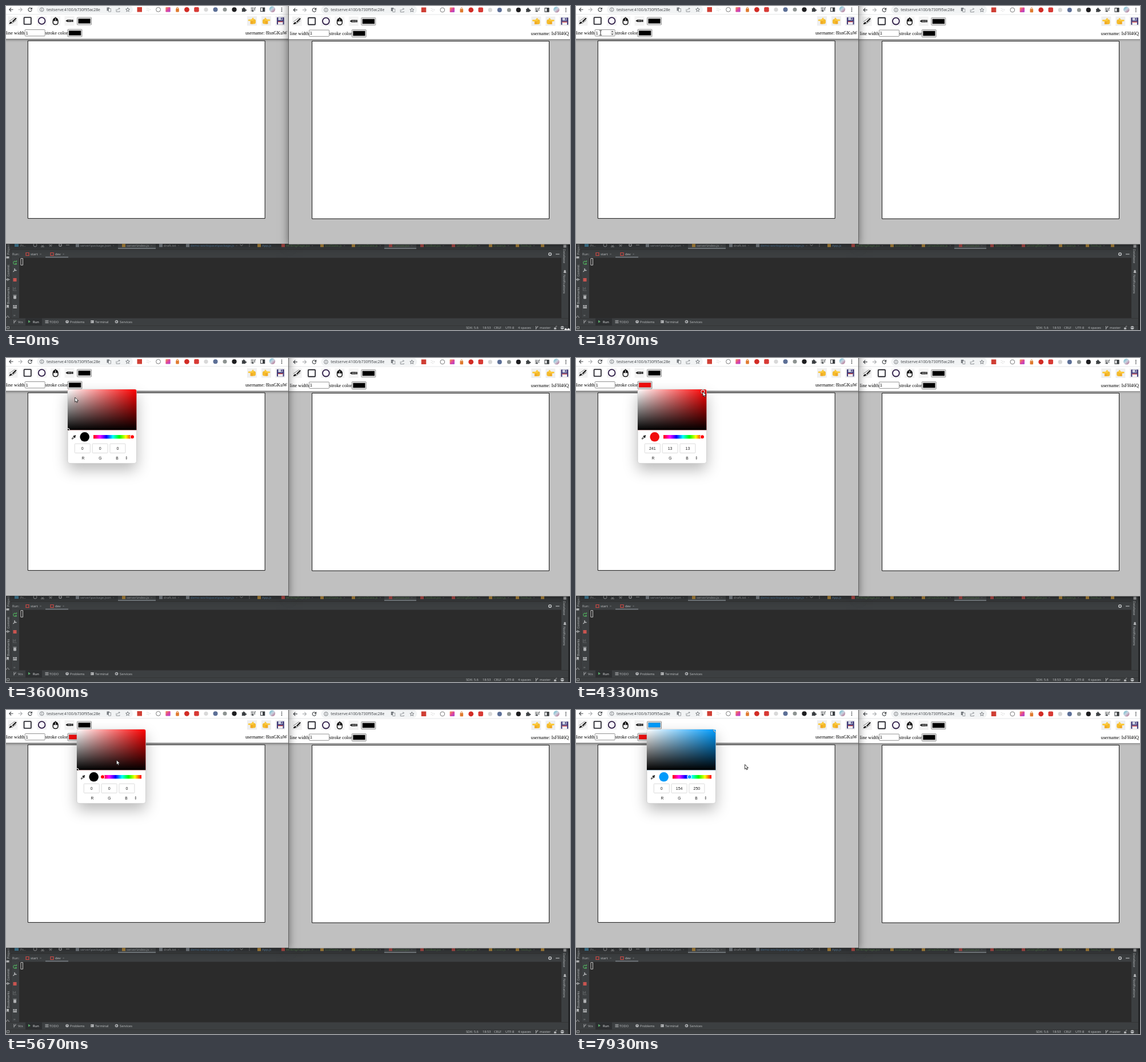
An HTML page with a canvas for the animation above (8000 ms loop, 987 by 568 pixels).

```html
<!DOCTYPE html>
<html lang="en">
<head>
<meta charset="utf-8">
<title>Shared drawing board</title>
<style>
html, body { margin: 0; width: 100%; height: 100%; overflow: hidden; background: #2b2b2b; }
canvas { display: block; }
</style>
</head>
<body>
<canvas id="stage" width="987" height="568"></canvas>
<script>
const ctx = document.getElementById('stage').getContext('2d');
const LOOP = 8000, TAU = Math.PI * 2;
const SANS = '"Noto Sans", sans-serif', ARIAL = '"Liberation Sans", Arial, sans-serif';
const SERIF = '"Liberation Serif", "Times New Roman", serif';
const HUE = 203;

// ---- drawing helpers ----
function rect(x, y, w, h, color) {
  ctx.fillStyle = color;
  ctx.fillRect(x, y, w, h);
}
function box(x, y, w, h, fill, stroke, radius = 0, width = 1) {
  ctx.beginPath();
  ctx.roundRect(x, y, w, h, radius);
  if (fill) { ctx.fillStyle = fill; ctx.fill(); }
  if (stroke) { ctx.strokeStyle = stroke; ctx.lineWidth = width; ctx.stroke(); }
}
function disc(x, y, r, fill, stroke, width = 1) {
  ctx.beginPath();
  ctx.arc(x, y, r, 0, TAU);
  if (fill) { ctx.fillStyle = fill; ctx.fill(); }
  if (stroke) { ctx.strokeStyle = stroke; ctx.lineWidth = width; ctx.stroke(); }
}
function icon(x, y, path, stroke, width = 1, fill) {
  ctx.save();
  ctx.translate(x, y);
  const p = new Path2D(path);
  if (fill) { ctx.fillStyle = fill; ctx.fill(p); }
  if (stroke) { ctx.strokeStyle = stroke; ctx.lineWidth = width; ctx.stroke(p); }
  ctx.restore();
}
function text(str, x, y, size, color, font = SANS, align = 'left') {
  ctx.font = `${size}px ${font}`;
  ctx.fillStyle = color;
  ctx.textAlign = align;
  ctx.textBaseline = 'alphabetic';
  ctx.fillText(str, x, y);
}
function turned(str, x, y, angle) {
  ctx.save();
  ctx.translate(x, y);
  ctx.rotate(angle);
  text(str, 0, 0, 5.6, '#b4b8ba');
  ctx.restore();
}
function shadow(color, blur, dy = 0) {
  ctx.shadowColor = color;
  ctx.shadowBlur = blur;
  ctx.shadowOffsetY = dy;
}

// ---- editor behind the two browser windows ----
const TABS = [
  ['server\\package.json', 130, '#a9b0b5', '#8a9299'], ['server\\index.js', 211, '#bcc1c5', '#c99a45'],
  ['draft.txt', 276, '#b0b5b8', '#8a9299'], ['demo-workspace\\package.js', 323, '#5b8bb5', '#8a9299'],
  ['App.js', 448, '#6897bb', '#c99a45'], ['WritingPage.jsx', 490, '#5f8a55', '#c75450'],
  ['toolState.js', 558, '#5f8a55', '#c99a45'], ['canvasState.js', 613, '#5f8a55', '#c99a45'],
  ['Canvas.jsx', 678, '#5f8a55', '#c75450'], ['Toolbar.jsx', 733, '#5f8a55', '#c75450'],
  ['SettingBar.jsx', 788, '#5f8a55', '#c75450'], ['Eraser.js', 853, '#5f8a55', '#c99a45'],
  ['Tools.js', 900, '#5f8a55', '#c99a45'], ['', 944, '', '#c99a45']
];
const FOOTER = [['Vcs', 21], ['Run', 47], ['TODO', 76], ['Problems', 112], ['Terminal', 156], ['Services', 199]];
const STATUS = [['SDK: 5.6', 805], ['18:53', 834], ['CRLF', 854], ['UTF-8', 874], ['4 spaces', 896], ['master', 934]];

function drawEditor() {
  const grey = '#afb1b3';
  rect(0, 410, 987, 158, '#3c3f41');
  rect(196, 412, 66, 14, '#4e5254');
  rect(662, 412, 56, 14, '#4e5254');
  rect(196, 424, 66, 2, '#7d8488');
  rect(662, 424, 56, 2, '#7d8488');
  rect(0, 426, 972, 1, '#323232');
  rect(15, 417, 7, 5, '#4b8fae');
  text('Pr...', 25, 421.5, 5.7, grey);
  disc(51, 419, 3, null, grey);
  icon(64, 419, 'M-3 3H3M-2 0L0 2L2 0', grey);
  icon(78, 419, 'M-3 0H3M-2 3L0 1L2 3', grey);
  disc(95, 419, 2.2, null, grey, 1.5);
  rect(105, 418.5, 6, 1, grey);
  for (const [name, x, color, mark] of TABS) {
    rect(x - 8, 417, 6, 5.5, mark);
    text(name, x, 421.6, 5.7, color);
    if (name && x !== 448) text('×', x + ctx.measureText(name).width + 3, 421.5, 5, '#777');
  }
  icon(412, 419, 'M-2.5 -1L0 1.5L2.5 -1', grey);
  icon(426, 419, 'M0 -2V-1M0 0V1M0 2V3', grey);

  // run tool window
  text('Run:', 11, 437.3, 5.7, grey);
  for (const [name, x] of [['start', 43], ['dev', 86]]) {
    box(x - 8, 432.5, 5, 5, null, '#d04a45', 0, 1.2);
    text(name, x, 437.3, 5.8, '#c0c3c5');
    text('×', x + (x < 50 ? 16 : 13), 437.3, 5.5, '#808487');
  }
  rect(69, 439.5, 40, 2, '#747a80');
  disc(952, 435, 2.2, null, '#c0c3c5', 1.6);
  rect(962, 434.5, 6.5, 1.1, '#c0c3c5');
  rect(23, 441.5, 949, 105.5, '#2b2b2b');
  box(25.9, 442.6, 3.6, 11.6, null, '#c4c4c4', 0, 1);
  rect(8.6, 427, .8, 120, '#323232');
  icon(15.5, 450, 'M2.5 -1A2.7 2.7 0 1 0 2 2M0 -2H3V-4', '#4fa65b', 1.2);
  disc(17.5, 452, 1.6, '#4fa65b');
  icon(15.5, 463, 'M-3 3L1 -1M0 -3A2 2 0 0 0 3 0', grey, 1.4);
  rect(12.5, 477, 6, 6, '#c75450');
  icon(15.5, 496, 'M-3 -3V3H3M-1 -2V1M1 -3V1', '#626567');
  icon(15.5, 510, 'M-3 -3H3M-2 -1.5V3H2V-1.5Z', grey, 1, grey);
  rect(12.3, 524.5, 3, 2.4, grey);
  rect(16, 524.5, 3, 2.4, grey);
  rect(12.3, 527.7, 6.7, 2.4, grey);
  text('››', 13, 544, 5.5, grey);
  turned('Project', 5.5, 436, -Math.PI / 2);
  turned('Commit', 5.5, 474.5, -Math.PI / 2);
  turned('Bookmarks', 5.5, 522.5, -Math.PI / 2);
  rect(.5, 439, 5, 3.5, grey);
  disc(3, 479.5, 1.7, null, grey);
  rect(0, 479, 7, .8, grey);
  icon(3, 527, 'M-2 -3H2V3L0 1L-2 3Z', null, 1, grey);
  icon(3, 545, 'M-2 2V0L0 -2L2 0V2', grey, .8);

  // right stripe
  rect(984, 417, 3, 151, '#222426');
  rect(975.5, 418.5, 5, 5, grey);
  turned('Database', 975.2, 426, Math.PI / 2);
  icon(978, 466, 'M-2.5 2H2.5L1.7 0V-1.5A1.7 1.7 0 0 0 -1.7 -1.5V0Z', null, 1, grey);
  turned('Notifications', 975.2, 471, Math.PI / 2);

  // bottom bars
  rect(0, 547, 984, .7, '#323232');
  rect(34, 547.5, 29, 12.5, '#2d2f31');
  rect(0, 560, 984, .7, '#323232');
  for (const [name, x] of FOOTER) text(name, x, 556.2, 5.75, x === 47 ? '#e4e6e8' : '#b7babc');
  icon(15.5, 553.5, 'M-1.5 -3V3M1.5 -3V-1L-1.5 1', grey);
  icon(40, 553.5, 'M-1 -3V2L3 0Z', null, 1, '#59a869');
  icon(71.5, 553.5, 'M-3 -2H3M-3 0H3M-3 2H3', grey);
  disc(107, 553.5, 2.8, grey);
  rect(106.6, 551.7, .9, 2.3, '#3c3f41');
  box(148.2, 551, 5.5, 5, grey);
  icon(150, 553.5, 'M-1 -1L0 0L-1 1', '#3c3f41', .8);
  disc(193.5, 553.5, 2.8, grey);
  icon(193, 553.5, 'M-.6 -1.5V1.5L2 0Z', null, 1, '#3c3f41');
  box(1.5, 561.8, 4, 4, null, grey, 0, .8);
  for (const [name, x] of STATUS) text(name, x, 566.3, 5.7, '#b7babc');
  icon(929, 564, 'M-1.5 -3V3M1.5 -3V-1L-1.5 1', grey);
  box(959, 563.7, 4, 3.2, grey);
  icon(962, 563, 'M0 0V-1A1.4 1.4 0 0 1 2.5 -1', grey, .8);
  disc(973.5, 564, 3, '#b9bcbe');
  rect(970, 563, 7, 1, '#55585a');
}

// ---- browser window ----
function drawChrome() {
  const ink = '#3c4043';
  icon(9, 6.3, 'M3.5 0H-3M0 -3.2L-3.2 0L0 3.2', ink, 1.1);
  icon(25, 6.3, 'M-3.5 0H3M0 -3.2L3.2 0L0 3.2', '#a9acaf', 1.1);
  icon(42, 6.3, 'M2.8 -1.6A3.2 3.2 0 1 0 3.2 .8M3.4 -3.6V-.8H.6', ink, 1.1);
  box(54, -1, 168, 14, '#f1f3f4', null, 7);
  disc(62.7, 6.3, 3.3, null, '#5f6368', .8);
  rect(62.3, 5.7, .8, 2.4, '#5f6368');
  rect(62.3, 4.2, .8, .9, '#5f6368');
  text('testserve:4100/b730f95ac28e', 71, 8.8, 6.82, '#45484c');
  box(176.5, 2.5, 4.5, 6, '#777b80');
  box(179.5, 4.5, 4, 5.5, '#f1f3f4', '#777b80', 0, .7);
  icon(196, 6.5, 'M-3 -1V3.5H3V2M-1 1C-1 -1 0 -2 3 -2M1.5 -3.7L3.2 -2L1.5 -.3', '#777b80', .8);
  icon(213, 6.4, 'M0 -3.5L1 -1.1L3.5 -.9L1.6 .7L2.2 3.2L0 1.9L-2.2 3.2L-1.6 .7L-3.5 -.9L-1 -1.1Z', '#5f6368', .8);

  box(229.5, 2, 8.5, 8.5, '#cf3f35');
  for (let i = 0; i < 5; i++) disc(247 + i % 3 * 2.6, 4 + i * 1.1, .7, '#c9c9c9');
  disc(266.5, 6.3, 3.9, null, '#6a6a6a', .9);
  const pink = ctx.createLinearGradient(279, 2, 288, 11);
  pink.addColorStop(0, '#f2a24a');
  pink.addColorStop(.5, '#e0449b');
  pink.addColorStop(1, '#9a4fe0');
  box(279.3, 2, 8.4, 8.5, pink, null, 1);
  box(297.2, 4.6, 5.6, 6, '#e07a2e', null, 1);
  icon(300, 5, 'M-1.6 0V-1A1.6 1.6 0 0 1 1.6 -1V0', '#e07a2e');
  disc(316.4, 6.3, 4.4, '#d22c25');
  box(329.2, 2, 8.5, 8.5, '#d83a35', null, 2);
  disc(350, 6.3, 3.6, '#d8d8d8');
  disc(366.5, 6.3, 4, '#5c6f96');
  disc(383, 6.3, 3.5, '#8d9391');
  disc(399.5, 6.3, 4.1, '#1d1d1f');
  icon(416, 6.3, 'M-3.2 -2H-1A1.3 1.3 0 1 1 1.3 -2H3V0A1.3 1.3 0 1 1 3 2V3.6H-3.2V1.5A1.2 1.2 0 0 0 -3.2 -.3Z', null, 1, ink);
  icon(432.5, 6, 'M-4 -2.5H1M-4 0H1M-4 2.5H-1M2.7 2V-3H4.5', ink, 1);
  disc(431.9, 8.5, 1.5, ink);
  box(445.7, 3, 7, 6.5, null, ink, 0, 1.1);
  rect(449, 3, 4, 6.5, ink);
  const face = ctx.createLinearGradient(461, 1, 470, 11);
  face.addColorStop(0, '#62b7c9');
  face.addColorStop(.5, '#c8d3e0');
  face.addColorStop(1, '#b46c8c');
  disc(466, 5.8, 5.2, face);
  for (const y of [3.6, 6.4, 9.2]) disc(482.5, y, .9, ink);
}

function hand(x, dir) {
  box(x - 8.5, 18, 17, 16.5, '#efefef');
  ctx.save();
  ctx.translate(x, 26);
  ctx.scale(dir, 1);
  box(-2.5, -3, 9, 8.5, '#f5bb2c', null, 3);
  box(-6.8, -2.6, 9, 2.9, '#fbc93b', null, 1.4);
  icon(0, 0, 'M-1 -2L1 -5.5L3 -5L2.5 -1Z', null, 1, '#fbc93b');
  for (const y of [.6, 2.4, 4]) box(-3.2, y - .2, 5, 1.6, '#f0a824', null, .8);
  ctx.restore();
}

function swatch(x, y, color) {
  box(x + .5, y + .5, 25, 13, '#efefef', '#767676', 1, .8);
  box(x + 2.5, y + 2.7, 21.2, 8.4, color, '#777', 0, .5);
}

function drawTools(user, userX, fillColor, strokeColor, spinner) {
  for (const x of [12, 37.5, 62.5, 86.5, 111]) box(x - 8.5, 18, 17, 16.5, '#f3f3f3');
  icon(12, 26, 'M-6.5 5.5C-6 2 -3.5 1 -1.6 1.8C-1 4 -3 5.5 -6.5 5.5ZM-1.3 .8L5 -5.5L6.7 -4L.2 2.4Z', null, 1, '#1c1c1c');
  icon(12, 26, 'M-6.5 1L3.5 -6M-2 5L6 -1', '#555', .7);
  box(31.6, 20, 12.2, 12, '#fff', '#17171f', .8, 1.6);
  disc(62.6, 26, 5.9, '#faf7fd', '#2b1a44', 1.8);
  box(82.3, 22.5, 8.6, 10, '#fff', '#151515', 3.5, 1.5);
  icon(86.6, 26, 'M-4.6 .3V-1A4.6 4.6 0 0 1 4.6 -1V.3ZM-.8 -4V-6.5H.8V-4Z', null, 1, '#151515');
  icon(86.6, 26, 'M0 -4V0', '#fff', .9);
  icon(111, 26, 'M-6.7 0L-3.7 -2H6.5V2H-3.7Z', null, 1, '#161616');
  rect(108, 25.2, 5.5, 1.5, '#999');
  rect(114.6, 24, .8, 4, '#ddd');
  swatch(124, 19.5, fillColor);
  hand(430.5, 1);
  hand(455.5, -1);
  box(471.5, 18, 17, 16.5, '#efefef');
  box(474, 19.7, 12.6, 12.8, '#403a78', null, 1);
  rect(476.4, 19.7, 7.6, 5.2, '#cfd4e4');
  rect(481.2, 20.4, 1.7, 3.6, '#403a78');
  rect(476, 27, 8.6, 5.5, '#f1f1f4');
  rect(476, 27, 8.6, 1.2, '#d3403d');

  text('line width', -.5, 50, 8.25, '#000', SERIF);
  box(33.2, 41.5, 35, 11.2, '#fff', '#767676', 1, .8);
  text('1', 34.8, 49.8, 7, '#000', ARIAL);
  if (spinner) {
    rect(60, 42.3, 7.5, 9.8, '#f0f0f0');
    icon(63.6, 47.2, 'M-2 -1.4L0 -3.8L2 -1.4ZM-2 1.4L0 3.8L2 1.4Z', null, 1, '#555');
  }
  text('stroke color', 68.7, 50, 8.25, '#000', SERIF);
  swatch(107.5, 40.5, strokeColor);
  text('username: ' + user, userX, 50, 8.2, '#000', SERIF);
}

function drawWindow(dx, dy, x, w, user, userX, fillColor, strokeColor, spinner) {
  ctx.save();
  ctx.translate(dx, dy);
  ctx.save();
  shadow('rgba(0,0,0,.55)', 15, 3);
  rect(x, -20, w, 437, '#c0c0c0');
  ctx.restore();
  ctx.beginPath();
  ctx.rect(x, -1, w, 418);
  ctx.clip();
  ctx.save();
  shadow('rgba(0,0,0,.75)', 5, 0);
  rect(x - 10, -10, w + 20, 67.5, '#fff');
  ctx.restore();
  rect(x, 14, w, .8, '#dfe1e3');
  drawChrome();
  drawTools(user, userX, fillColor, strokeColor, spinner);
  box(38.3, 61, 414.9, 311.4, '#fff', '#111', 0, 1);
  rect(x, 416.3, w, .7, '#9a9a9a');
  ctx.restore();
}

// ---- colour picker ----
const PICK_W = 120.5, SHADE_H = 71.5;

function colorAt(hue, s, v) {
  const ch = n => {
    const k = (n + hue / 60) % 6;
    return Math.round(255 * v * (1 - s * Math.max(0, Math.min(k, 4 - k, 1))));
  };
  return [ch(5), ch(3), ch(1)];
}
const css = c => `rgb(${c})`;

function drawPicker(x, y, hue, s, v, rgb, focused) {
  ctx.save();
  ctx.translate(x, y);
  ctx.save();
  shadow('rgba(0,0,0,.28)', 26, 11);
  box(0, 0, PICK_W, 129.7, '#fff', null, 4);
  ctx.restore();
  box(0, 0, PICK_W, 129.7, '#fff', '#bbb', 4, .6);

  ctx.save();
  ctx.beginPath();
  ctx.roundRect(0, 0, PICK_W, SHADE_H, [3, 3, 0, 0]);
  ctx.clip();
  rect(0, 0, PICK_W, SHADE_H, css(colorAt(hue, 1, 1)));
  const white = ctx.createLinearGradient(0, 0, PICK_W, 0);
  white.addColorStop(0, '#fff');
  white.addColorStop(1, 'rgba(255,255,255,0)');
  rect(0, 0, PICK_W, SHADE_H, white);
  const black = ctx.createLinearGradient(0, 0, 0, SHADE_H);
  black.addColorStop(0, 'rgba(0,0,0,0)');
  black.addColorStop(1, '#000');
  rect(0, 0, PICK_W, SHADE_H, black);
  const kx = s * PICK_W, ky = (1 - v) * SHADE_H;
  disc(kx, ky, 3.2, css(rgb), '#fff', 1.2);
  disc(kx, ky, 4, null, '#222', .5);
  ctx.restore();

  icon(11, 83.5, 'M-3.5 3.5L-3 1.8L.5 -1.7L1.8 -.4L-1.7 3.1Z', '#111', 1);
  icon(11, 83.5, 'M-.8 -2.2L2.2 .8M.8 -.8L2.8 -2.8', '#111', 1.9);
  disc(29.7, 83.3, 8.3, css(rgb));
  const bar = ctx.createLinearGradient(45, 0, 113, 0);
  for (let i = 0; i <= 6; i++) bar.addColorStop(i / 6, `hsl(${360 - i * 60},100%,50%)`);
  rect(45, 80, 68, 6.4, bar);
  const hx = 45 + 68 * (360 - hue) / 360;
  if (focused) disc(hx, 83.2, 5, '#fff', '#000', 1.4);
  disc(hx, 83.2, 3.5, css(colorAt(hue, 1, 1)), '#fff', 1.1);

  rgb.forEach((n, i) => {
    box(12.3 + i * 30.8, 95.3, 27, 16.2, '#fff', '#d2d2d2', 1, .8);
    text(n, 25.8 + i * 30.8, 106, 7, '#222', ARIAL, 'center');
    text('RGB'[i], 27 + i * 29.8, 122.6, 6.7, '#222', ARIAL, 'center');
  });
  icon(102.8, 120.2, 'M-1.5 -.8L0 -2.6L1.5 -.8ZM-1.5 .8L0 2.6L1.5 .8Z', null, 1, '#333');
  ctx.restore();
}

// ---- pointer: time, x, y ----
const PATH = [
  [70, 981, 564], [350, 640, 390], [650, 230, 150], [870, 67, 62], [930, 62, 56],
  [1200, 47, 39], [1530, 43, 47], [1870, 43, 47], [2200, 47, 48], [2450, 85, 50], [2670, 121.5, 53],
  [2800, 114, 50], [3330, 114, 50], [3470, 116, 56], [3600, 120.5, 69], [3800, 155, 72],
  [4000, 205, 65], [4270, 223, 59], [4330, 222, 59], [4450, 222, 59], [4700, 215, 45],
  [5000, 144.5, 30.5], [5130, 142, 30], [5270, 142, 31], [5330, 142, 37], [5600, 178, 78],
  [5850, 232, 112], [6130, 201, 117], [6330, 198, 116.5], [6600, 198, 116.5], [6800, 221, 60.5],
  [7000, 232, 46], [7300, 245, 35.4], [7530, 245, 35.4], [7930, 295.5, 95.5]
];
function pointerAt(t) {
  if (t <= PATH[0][0]) return PATH[0].slice(1);
  const i = PATH.findIndex(p => p[0] > t);
  if (i < 0) return PATH[PATH.length - 1].slice(1);
  const [t0, x0, y0] = PATH[i - 1], [t1, x1, y1] = PATH[i];
  const k = (t - t0) / (t1 - t0);
  return [x0 + (x1 - x0) * k, y0 + (y1 - y0) * k];
}

// Saturation and value picked by a drag lasting from t0 to t1.
function picked(t, t0, t1, x, y) {
  if (t < t0) return [0, 0];
  const [px, py] = pointerAt(Math.min(t, t1));
  const unit = n => Math.max(0, Math.min(1, n));
  return [unit((px - x) / PICK_W), 1 - unit((py - y) / SHADE_H)];
}

function drawPointer(t) {
  const [x, y] = pointerAt(t);
  if (t < 70) {
    icon(982, 567, 'M-4 0H4M-2 -2L-4 0L-2 2M2 -2L4 0L2 2', '#fff', 1.4);
  } else if (t >= 1070 && t < 2340) {
    icon(x, y, 'M-2 -4H-.6L0 -3.5L.6 -4H2M0 -3.5V3.5M-2 4H-.6L0 3.5L.6 4H2', '#111', .9);
  } else {
    icon(x, y, 'M0 0V8.2L1.9 6.5L3.2 9.3L4.6 8.7L3.4 6H6Z', '#222', .9, '#fff');
  }
}

function draw(t) {
  ctx.clearRect(0, 0, 987, 568);
  drawEditor();

  const [s1, v1] = picked(t, 3960, 4330, 108, 55);
  const [s2, v2] = picked(t, 7000, 7500, 124, 34);
  const stroke = colorAt(0, s1, v1), fill = colorAt(HUE, s2, v2);
  const left = () => drawWindow(0, 0, -1, 495, '8lsnGKuW', 419, css(fill), css(stroke), t >= 1130 && t < 2340);
  const right = () => drawWindow(497.3, .6, -2.3, 495, 'IsFH46Q', 421.5, '#000', '#000', false);

  // A click brings the left window to the front.
  if (t < 1870) { left(); right(); } else { right(); left(); }
  rect(494, 0, .8, 417, '#777');

  if (t >= 3200 && t < 4600) drawPicker(108, 55, 0, s1, v1, stroke, false);
  if (t >= 5200) {
    const chosen = t >= 6470;
    drawPicker(124, 34, chosen ? HUE : 360, s2, v2, fill, chosen && t < 7000);
  }
  drawPointer(t);
}

function tick() {
  draw(performance.now() % LOOP);
  requestAnimationFrame(tick);
}
tick();
</script>
</body>
</html>
```
